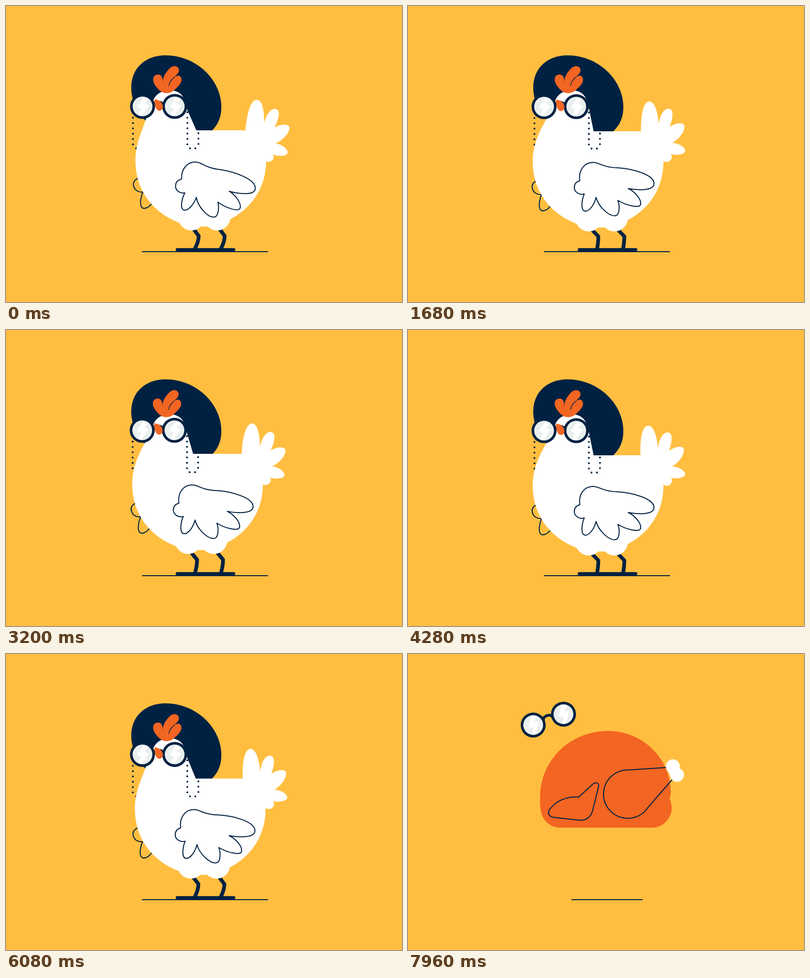
Animation, 800 px wide and 600 px high, one loop 8000 ms. Source, as an HTML page with a canvas:

```html
<!DOCTYPE html>
<html lang="en">
<head>
<meta charset="utf-8">
<title>Chicken dance</title>
<style>
html, body { margin: 0; width: 100%; height: 100%; overflow: hidden; background: #ffbe40; }
canvas { display: block; width: 800px; height: 600px; }
</style>
</head>
<body>
<canvas id="stage" width="800" height="600"></canvas>
<script>
const ctx = document.getElementById('stage').getContext('2d');
const LOOP = 8000, STEP = 40;
const BEAT = 520, WAG = 910;
const POOF = 6800, SWAP = 7120, JUMP = 7600;
const YELLOW = '#ffbe40', NAVY = '#002142', ORANGE = '#f26522', CREAM = '#fff5de', WHITE = '#fff';
const TAU = Math.PI * 2;

const HAT = new Path2D('M253 165 C253 125 283 100 322 100 C385 100 435 150 435 205 C435 230 425 246 408 260 L320 260 C272 235 253 200 253 165 Z');
const COMB = new Path2D('M314 174 C305 168 297 157 297 149 C297 142 302 139 307 139 C313 139 316 144 316 150 L316 158 C316 148 319 139 327 130 C333 123 337 122 340 122 C347 122 350 127 349 132 C348 137 344 139 340 144 C343 142 346 141 348 141 C353 142 355 147 354 152 C352 160 344 166 339 171 C332 178 321 178 314 174 Z');
const CREASE = new Path2D('M329 161 C330 155 334 149 340 144');
const BEAK = new Path2D('M299 190 C308 190 316 196 316 205 C316 210 312 213 308 213 C302 211 299 203 299 190 Z');
const TAIL = new Path2D('M472 260 C472 215 480 192 491 192 C502 192 508 215 508 239 C512 220 520 208 529 208 C541 208 538 228 530 246 C540 238 557 236 560 243 C562 255 548 271 534 278 C546 278 560 287 560 295 C558 303 540 304 530 300 C536 306 530 316 522 316 C516 316 512 312 512 308 L480 300 Z');
const WING = new Path2D('M347 354 C344 333 356 317 374 317 C386 317 392 327 424 328 C455 330 497 342 497 360 C497 376 460 373 445 370 C458 376 472 392 470 402 C468 411 440 404 424 394 C428 404 428 424 419 425 C405 427 384 405 380 388 C377 400 368 416 358 416 C348 415 351 393 356 381 C346 384 336 377 336 368 C336 360 340 356 347 354 Z');
const BACK_WING = new Path2D('M260 354 C252 358 250 364 251 369 C253 378 260 383 270 382 C266 390 264 403 266 410 C270 420 283 414 290 402');
const ROAST = new Path2D('M308 352 C288 352 270 338 268 314 C266 305 267 297 267 290 C267 215 328 156 404 156 C475 156 531 213 531 280 L529 294 L532 305 C537 330 516 352 494 352 Z');
const ROAST_WING = new Path2D('M345 290 L373 264 C379 258 387 262 385 269 L373 317 C370 331 358 338 347 337 L293 331 C284 329 281 321 287 314 C300 297 322 288 345 290 Z');
const BOLT = new Path2D('M3 -19 L-11 1 L-2 5 L-9 18 L-1 19 L13 -2 L4 -6 L13 -15 Z');

const clamp = x => Math.max(0, Math.min(1, x));
const mix = (a, b, k) => a + (b - a) * k;

function fill(path, color) {
  ctx.fillStyle = color;
  ctx.fill(path);
}

function stroke(path, width, color = NAVY) {
  ctx.lineWidth = width;
  ctx.strokeStyle = color;
  ctx.stroke(path);
}

function disc(x, y, r, color) {
  ctx.fillStyle = color;
  ctx.beginPath();
  ctx.arc(x, y, r, 0, TAU);
  ctx.fill();
}

function line(x1, y1, x2, y2, width) {
  const p = new Path2D();
  p.moveTo(x1, y1);
  p.lineTo(x2, y2);
  stroke(p, width);
}

// Run a drawing moved by (dx, dy) and turned about a pivot.
function placed(dx, dy, angle, px, py, draw) {
  ctx.save();
  ctx.translate(px + dx, py + dy);
  ctx.rotate(angle);
  ctx.translate(-px, -py);
  draw();
  ctx.restore();
}

function pose(t) {
  const a = TAU * t / BEAT;
  const shift = TAU * 58 / BEAT;
  return {
    dx: 4.9 - 7.16 * Math.sin(a - shift),
    dy: -0.6 - 1.39 * Math.cos(2 * a) - 3.08 * Math.sin(2 * a),
    flap: (2.65 + 2.35 * Math.cos(2 * a) - 1.51 * Math.sin(2 * a)) * Math.PI / 180,
    wag: (3.2 + 6.95 * Math.cos(TAU * t / WAG - 1.48)) * Math.PI / 180
  };
}

function glasses(cx, cy, angle) {
  ctx.save();
  ctx.translate(cx, cy);
  ctx.rotate(angle);
  stroke(new Path2D('M-9.5 -3 C-7 -10.5 7 -10.5 9.5 -3'), 5.5);
  for (const x of [-32.5, 32.5]) {
    ctx.save();
    ctx.translate(x, 0);
    disc(0, 0, 25.3, NAVY);
    disc(0, 0, 20, '#e9efee');
    fill(BOLT, WHITE);
    ctx.restore();
  }
  ctx.restore();
}

function dots(x, y, count) {
  for (let i = 0; i < count; i++) disc(x, y + i * 10.8, 1.9, NAVY);
}

function leg(x, dx, dy) {
  const kx = x + 13.5 + 0.5 * dx, ky = 467 + 0.5 * dy;
  const p = new Path2D();
  p.moveTo(x + 0.75 * dx, 453 + dy);
  p.lineTo(kx, ky);
  p.quadraticCurveTo(kx, 478, x + 11 - 0.1 * dx, 493);
  stroke(p, 7.5);
}

function body(dx, dy) {
  const p = new Path2D();
  const X = x => x + dx, Y = y => y + dy;
  p.moveTo(X(375), Y(254));
  p.lineTo(X(485), Y(254));
  p.bezierCurveTo(X(506), Y(270), X(516), Y(290), X(516), Y(315));
  p.bezierCurveTo(X(516), Y(384), X(470), Y(434), X(402), Y(449));
  p.lineTo(X(366), Y(449));
  p.bezierCurveTo(X(298), Y(434), X(252), Y(384), X(252), Y(315));
  p.bezierCurveTo(X(252), Y(274), X(272), Y(243), 285, 220);
  p.lineTo(297, 193);
  p.bezierCurveTo(306, 164, 354, 163, 361, 192);
  p.lineTo(366, 210);
  p.closePath();
  fill(p, WHITE);
  disc(X(365), Y(430), 27, WHITE);
  disc(X(417), Y(430), 27, WHITE);
}

function chicken(t) {
  const { dx, dy, flap, wag } = pose(t);
  const hang = draw => placed(0.1 * dx - 0.8, 0.25 * dy, 0, 0, 0, draw);
  fill(HAT, NAVY);
  placed(0.7 * dx, dy - 34 * flap, 0, 0, 0, () => stroke(BACK_WING, 2));
  hang(() => {
    dots(256.3, 227, 6);
    disc(263, 289, 1.9, NAVY);
  });
  leg(371, dx, dy);
  leg(423.5, dx, dy);
  line(346, 494, 460, 494, 6.5);
  placed(dx, dy + 0.8, wag, 505, 290, () => fill(TAIL, WHITE));
  body(dx, dy);
  hang(() => {
    dots(366.2, 216, 7);
    dots(388.6, 258.5, 3);
    dots(371.5, 289, 1);
    dots(382.5, 289, 1);
  });
  placed(0.7 * dx, dy, flap, 359, 365, () => {
    fill(WING, WHITE);
    stroke(WING, 2);
  });
  placed(0.1 * dx - 0.7, 0, 0, 0, 0, () => {
    fill(COMB, ORANGE);
    stroke(CREASE, 1.5);
  });
  const gx = 307.4 + 0.1 * dx, gy = 204 + 0.25 * dy;
  glasses(gx, gy, 0);
  placed(gx - 307.4, gy - 204, 0, 0, 0, () => fill(BEAK, ORANGE));
}

function roast(t) {
  const k = clamp((t - JUMP) / 360);
  const rise = 1 - (1 - k) * (1 - k);
  placed(0, 144 * (1 - rise), 0, 0, 0, () => {
    fill(ROAST, ORANGE);
    stroke(ROAST_WING, 2);
    const drum = new Path2D();
    drum.moveTo(523, 230);
    drum.lineTo(447, 235);
    drum.arc(444, 284, 49, -1.5, 0.57, true);
    drum.lineTo(535, 253);
    stroke(drum, 2);
    fill(new Path2D('M522 230 L535 219 L548 245 L533 254 Z'), WHITE);
    disc(535, 227.5, 14, WHITE);
    disc(543.5, 245, 14, WHITE);
  });
  const lift = 2.9 * k - 1.9 * k * k;
  glasses(mix(304, 283.5, k), mix(300, 133, lift), -0.346 * k);
  return rise;
}

function ground(half) {
  line(402 - half, 497.9, 402 + half, 497.9, 2);
}

function addBlob(p, cx, cy, r) {
  for (let i = 0; i <= 72; i++) {
    const a = i / 72 * TAU;
    const d = r * (1 + 0.018 * Math.sin(3 * a + 0.6) + 0.012 * Math.cos(5 * a));
    p.lineTo(cx + d * Math.cos(a), cy + d * Math.sin(a));
  }
  p.closePath();
}

// A puff that swells over the bird, then opens from its middle.
function poof(t) {
  const k = clamp((t - POOF) / 530);
  const size = 1 - Math.pow(1 - k, 3);
  const open = clamp((t - SWAP) / 420);
  if (size <= 0 || open >= 1) return;
  const cx = mix(382, 420, size), r = 275 * size;
  const p = new Path2D();
  addBlob(p, cx, 322, r);
  if (open > 0) {
    const hole = new Path2D();
    addBlob(hole, cx, 322, r * Math.sqrt(open));
    p.addPath(hole);
  }
  ctx.fillStyle = CREAM;
  ctx.fill(p, 'evenodd');
}

function draw(t) {
  ctx.fillStyle = YELLOW;
  ctx.fillRect(0, 0, 800, 600);
  ctx.lineCap = 'round';
  ctx.lineJoin = 'round';
  if (t < SWAP) {
    ground(126.5);
    chicken(t);
  } else {
    const rise = roast(t);
    ground(mix(126.5, 71, rise));
  }
  poof(t);
}

function tick() {
  const t = performance.now() % LOOP;
  draw(Math.floor(t / STEP) * STEP);
  requestAnimationFrame(tick);
}
tick();
</script>
</body>
</html>
```
